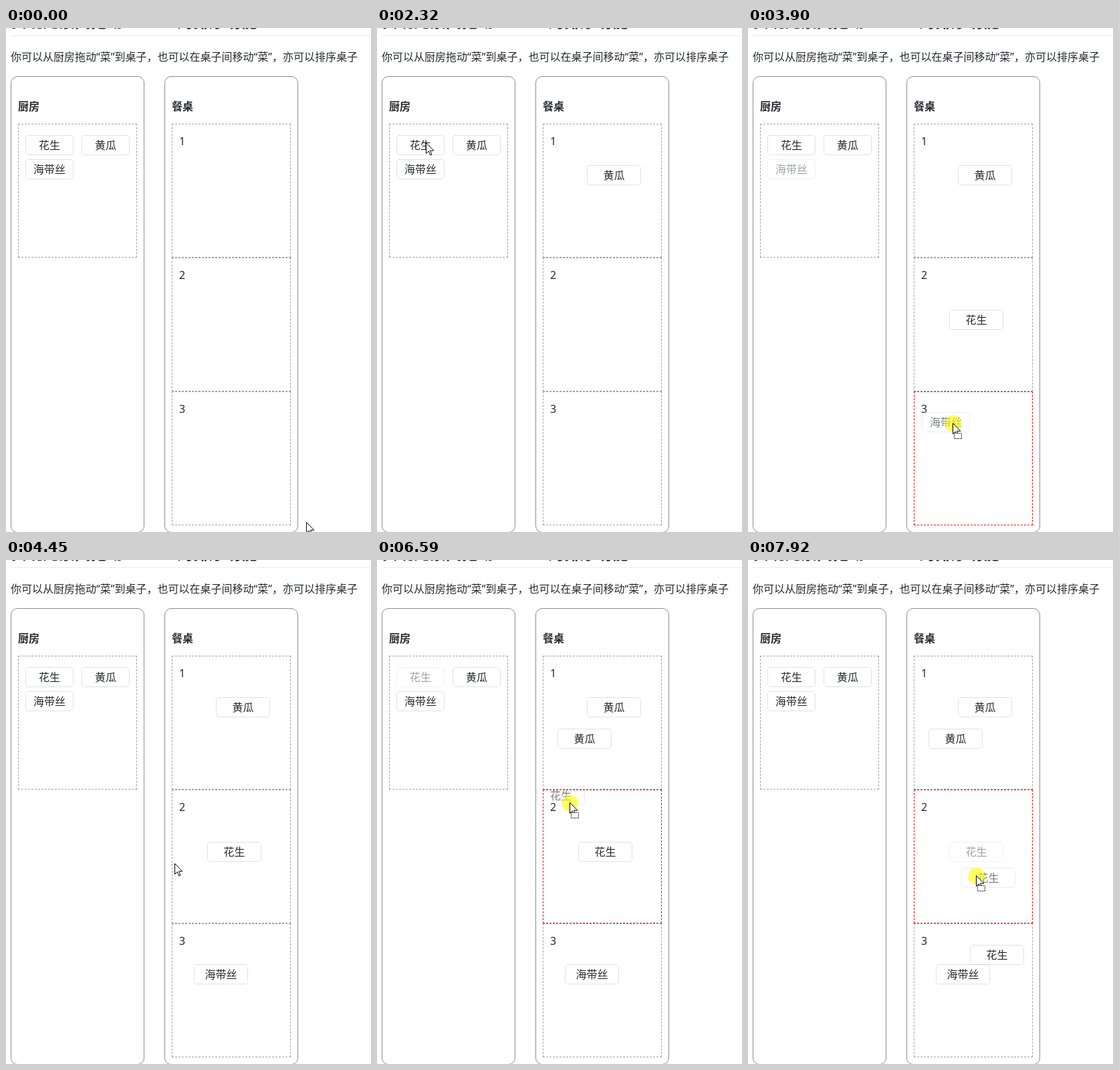
Recreate the animation shown at these times as an HTML page. Size 546 by 753 pixels, loop 7.99 s.

```html
<!DOCTYPE html>
<html lang="zh-CN">
<head>
<meta charset="utf-8">
<style>
  html, body { margin: 0; width: 100%; height: 100%; overflow: hidden; background: #fff; }
  #stage {
    position: relative; width: 546px; height: 753px; overflow: hidden;
    font: 16px/24px "Noto Sans", "Noto Sans CJK SC", "Noto Sans CJK", sans-serif;
    color: #24292e; white-space: nowrap;
  }
  #stage * { position: absolute; box-sizing: border-box; margin: 0; }
  h2 { left: 7px; top: -25px; font-size: 24px; line-height: 30px; }
  hr { left: 7px; top: 11px; width: 539px; height: 1px; border: 0; background: #eaecef; }
  p { left: 7px; top: 31px; }
  .column { top: 72px; width: 200px; height: 682px; border: 1px solid #8c8c8c; border-radius: 10px; }
  .column b { left: 10px; top: 32px; }
  .zone { width: 178px; height: 200px; border: 1px dashed #a0a0a0; padding: 13px 10px; }
  .zone.over { border-color: red; z-index: 1; }
  .dish {
    left: 0; top: 0; height: 30px; border: 1px dotted #c4c4c4; border-radius: 5px;
    line-height: 28px; text-align: center; z-index: 2;
  }
  #ghost { opacity: .6; z-index: 3; }
  #pointer { left: 0; top: 0; overflow: visible; z-index: 4; }
</style>
</head>
<body>
<div id="stage">
  <h2>实现元素间拖动 HTML 的排序功能</h2>
  <hr>
  <p>你可以从厨房拖动“菜”到桌子，也可以在桌子间移动“菜”，亦可以排序桌子</p>
  <div class="column" style="left:7px"><b>厨房</b></div>
  <div class="column" style="left:237px"><b>餐桌</b></div>
  <svg id="pointer" width="1" height="1">
    <circle cx="-.5" r="12.5" fill="#ff0" fill-opacity=".6"/>
    <path d="M-.5 -.5V15.5L3.2 12L5.8 18L8 17L5.5 11.2H10.8Z" fill="#fff" stroke="#000"/>
    <rect x="1.5" y="14.5" width="11" height="8" fill="#fff" stroke="#000" stroke-dasharray="1.5 1"/>
  </svg>
</div>
<script>
const DURATION = 7990;
const HIGHLIGHT_DELAY = 160;
const DROP_SHIFT = { x: 4, y: 2 }; // a dropped dish lands slightly off its ghost
const stage = document.getElementById('stage');
const pointer = document.getElementById('pointer');
const [press, , dragMark] = pointer.children;

function add(className, text = '') {
  const el = document.createElement('div');
  el.className = className;
  el.textContent = text;
  return stage.appendChild(el);
}

function move(el, x, y) {
  el.style.transform = `translate(${Math.round(x)}px, ${Math.round(y)}px)`;
}

function addZone(x, y, text) {
  const el = add('zone', text);
  el.style.left = x + 'px';
  el.style.top = y + 'px';
  return el;
}

function addDish(name, x, y, width = 72) {
  const el = add('dish', name);
  el.style.width = width + 'px';
  move(el, x, y);
  return { el, name, x, y, width };
}

addZone(18, 143);
const tables = [1, 2, 3].map((n, i) => addZone(248, 143 + 200 * i, n));
const [peanut, cucumber, kelp] = ['花生', '黄瓜', '海带丝'].map(
  (name, i) => addDish(name, 29 + 84 * (i % 2), 160 + 36 * Math.floor(i / 2)));

// The pointer holds a dish at an offset and may pass one point on its way.
function makeDrag(dish, start, end, [holdX, holdY], [x, y], via = []) {
  const result = addDish(dish.name, x, y, 81);
  const grab = { t: start, x: dish.x + holdX, y: dish.y + holdY, power: 2.6 };
  const drop = { t: end, x: x - DROP_SHIFT.x + holdX, y: y - DROP_SHIFT.y + holdY, power: 4 };
  return { dish, start, end, result, grab, stops: [grab, ...via, drop] };
}

const drags = [
  makeDrag(cucumber, 1070, 1460, [27, 16], [314, 205]),
  makeDrag(peanut, 2640, 3200, [36, 10], [301, 421], [{ t: 3050, x: 344, y: 433, power: 3 }]),
  makeDrag(kelp, 3520, 4300, [47, 17], [281, 604]),
  makeDrag(cucumber, 5210, 5590, [23, 19], [270, 252]),
  makeDrag(peanut, 6350, 7230, [50, 26], [332, 575], [{ t: 6590, x: 288, y: 362, power: 1 }]),
];
drags.push(makeDrag(drags[1].result, 7690, DURATION, [23, 12], [323, 462]));

const path = [{ t: 0, x: 451, y: 740 }, ...drags.flatMap(d => d.stops)];
const ghost = add('dish');
ghost.id = 'ghost';

// Every leg eases out towards its stop.
function pointerAt(t) {
  const i = path.findIndex(stop => stop.t > t);
  const from = path[i - 1], to = path[i];
  const left = (1 - (t - from.t) / (to.t - from.t)) ** to.power;
  return { x: to.x + (from.x - to.x) * left, y: to.y + (from.y - to.y) * left };
}

function render(t) {
  const { x, y } = pointerAt(t);
  const drag = drags.find(d => t >= d.start && t < d.end);
  move(pointer, x, y);
  press.style.display = dragMark.style.display = ghost.style.display = drag ? '' : 'none';

  for (const { dish, result, end } of drags) {
    dish.el.style.opacity = drag && drag.dish === dish ? .43 : 1;
    result.el.style.display = t >= end ? '' : 'none';
  }

  let hovered = -1;
  if (drag) {
    const { dish, grab, start } = drag;
    ghost.textContent = dish.name;
    ghost.style.width = dish.width + 'px';
    move(ghost, dish.x + x - grab.x, dish.y + y - grab.y);
    if (x >= 248 && t >= start + HIGHLIGHT_DELAY) hovered = Math.floor((y - 143) / 200);
  }
  tables.forEach((el, i) => el.classList.toggle('over', i === hovered));
}

const origin = performance.now();
function tick() {
  render((performance.now() - origin) % DURATION);
  requestAnimationFrame(tick);
}
tick();
</script>
</body>
</html>
```
